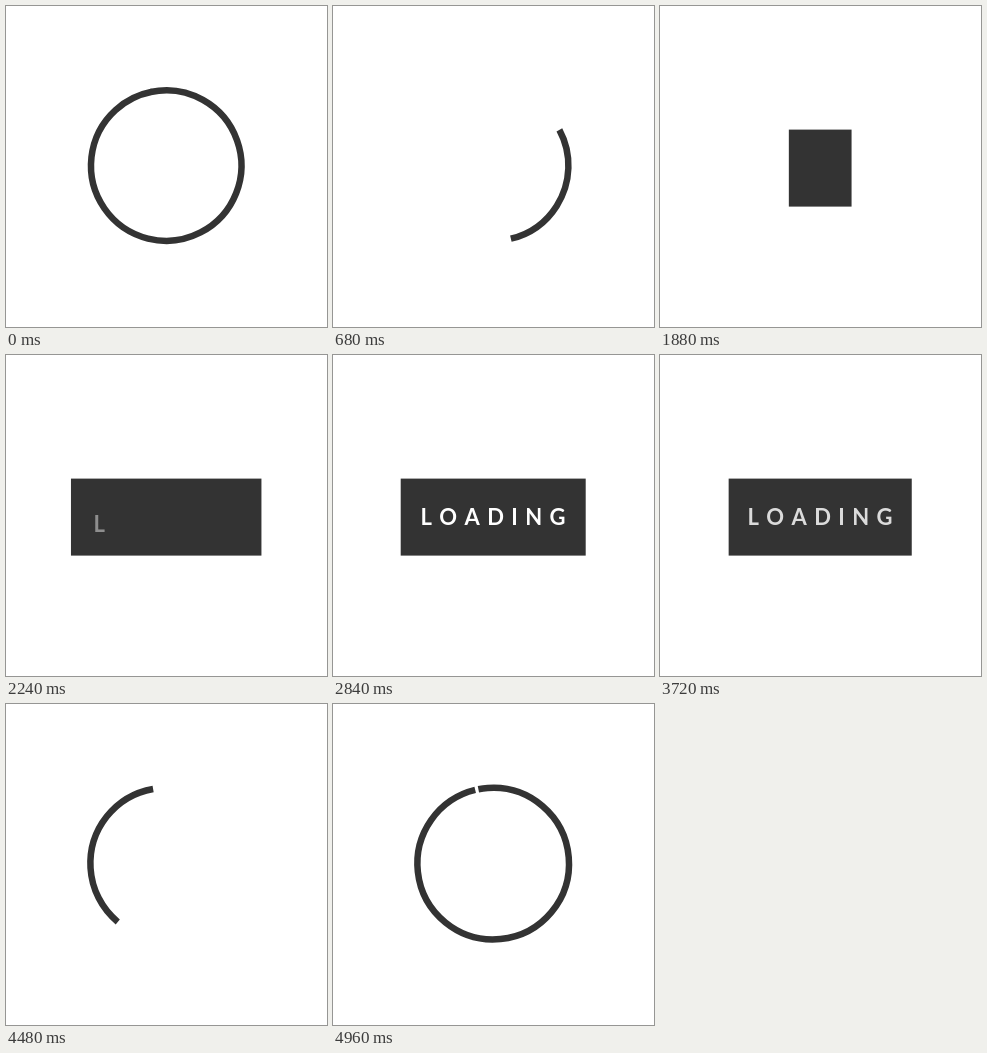
These frames come from a looping animation (321 by 321 pixels, 5000 ms). An HTML page:

```html
<!DOCTYPE html>
<html lang="en">
<head>
<meta charset="utf-8">
<title>Loading</title>
<style>
  html, body { margin: 0; width: 100%; height: 100%; overflow: hidden; background: #fff; }
  svg { position: absolute; left: 0; top: 0; display: block; }
  path { fill: none; stroke: #333; stroke-width: 6.5; }
  rect { fill: #333; }
  #word {
    position: absolute; left: 0; top: 148px; width: 320px;
    display: flex; justify-content: center; gap: 7.4px;
    font: 700 22px/27px Lato, "Open Sans", sans-serif; color: #fff;
  }
  #word span { opacity: 0; }
</style>
</head>
<body>
<svg width="321" height="321" viewBox="0 0 321 321">
  <path id="inward"/>
  <path id="outward"/>
  <rect id="panel"/>
</svg>
<div id="word"></div>
<script>
const LOOP = 5000;
const CX = 160.2, CY = 159.6;
const R_IN = 75.2, R_OUT = 75.8;
const TOP = 123.6, BOTTOM = 200.6, BAR = BOTTOM - TOP;
const SEAM = -12, LEAVE = 92, JOIN = 88;   // degrees clockwise from the top
const BEND = 30.5;                         // where the bar starts to curve, from the centre
const PANEL_IN = 1800, PANEL_OUT = 3960;

const $ = id => document.getElementById(id);
const rad = deg => deg * Math.PI / 180;
const clamp = v => Math.min(1, Math.max(0, v));

function ring(r) {
  const point = deg => [CX + r * Math.sin(rad(deg)), CY - r * Math.cos(rad(deg))];
  return {
    point,
    px: deg => rad(deg) * r,
    ahead(deg, d) {
      const [x, y] = point(deg);
      return [x + d * Math.cos(rad(deg)), y + d * Math.sin(rad(deg))];
    },
    arc(from, to) {
      const n = Math.ceil((to - from) / 90);
      let d = "";
      for (let i = 1; i <= n; i++) {
        d += ` A${r} ${r} 0 0 1 ${point(from + (to - from) * i / n)}`;
      }
      return d;
    }
  };
}

// Ring, hook under, bar upwards; then bar upwards, hook over, ring.
const a = ring(R_IN), b = ring(R_OUT);
const inDeg = LEAVE + 720 - SEAM;
const outDeg = 720 + SEAM - JOIN;
$("inward").setAttribute("d",
  `M${a.point(SEAM)}${a.arc(SEAM, LEAVE + 720)}` +
  ` C${a.ahead(LEAVE, 68)} ${CX},${CY + BEND + 61} ${CX},${CY + BEND} L${CX},${TOP}`);
$("outward").setAttribute("d",
  `M${CX},${BOTTOM} L${CX},${CY - BEND}` +
  ` C${CX},${CY - BEND - 61} ${b.ahead(JOIN, -68)} ${b.point(JOIN)}${b.arc(JOIN, JOIN + outDeg + 5)}`);

const inRing = a.px(inDeg);
const inEnd = $("inward").getTotalLength();
const outRing = $("outward").getTotalLength() - b.px(outDeg + 5);

// Keys: time, value, speed per ms
const inTail = [[80, 0, 0], [680, a.px(420 - SEAM), 1.4], [1240, inRing + 20, 0.5], [1800, inEnd - BAR, 0]];
const inHead = [[80, a.px(360) + 0.8, 0], [680, a.px(525 - SEAM), 0.9], [1240, inEnd - BAR, 0.38], [1800, inEnd, 0]];
const outTail = [[3960, 0, 0], [4200, 120, 0.85], [4800, outRing + b.px(outDeg - 360), 0]];
const outHead = [[3960, BAR, 0], [4200, 220, 1.15], [4800, outRing + b.px(outDeg - 80), 1.06], [5000, outRing + b.px(outDeg), 0]];
const panelWidth = [[1780, 6.5, 0.5], [2200, 192.5, 0], [2320, 185, 0], [3700, 185, 0], [3960, 6.5, -0.9]];

function at(keys, t) {
  if (t <= keys[0][0]) return keys[0][1];
  const i = keys.findIndex(k => k[0] > t);
  if (i < 0) return keys[keys.length - 1][1];
  const [t0, p, vp] = keys[i - 1], [t1, q, vq] = keys[i];
  const span = t1 - t0, u = (t - t0) / span, w = 1 - u;
  return p * w * w * (1 + 2 * u) + q * u * u * (3 - 2 * u) +
    span * u * w * (vp * w - vq * u);
}

function stroke(path, tail, head, visible) {
  path.style.display = visible ? "" : "none";
  if (visible) path.setAttribute("stroke-dasharray", `0 ${tail} ${head - tail} 9999`);
}

const panel = $("panel");
panel.setAttribute("y", TOP);
panel.setAttribute("height", BAR);

const letters = [..."LOADING"].map(c => {
  const span = document.createElement("span");
  span.textContent = c;
  $("word").append(span);
  return span;
});

function draw(t) {
  stroke($("inward"), at(inTail, t), at(inHead, t), t < PANEL_IN);
  stroke($("outward"), at(outTail, t), at(outHead, t), t >= PANEL_OUT);

  const width = at(panelWidth, t);
  panel.style.display = t >= PANEL_IN && t < PANEL_OUT ? "" : "none";
  panel.setAttribute("x", CX - width / 2);
  panel.setAttribute("width", width);

  const fade = 1 - clamp((t - 3700) / 120);
  letters.forEach((el, i) => {
    const left = 1 - clamp((t - 2200 - 80 * i) / 160);
    const p = 1 - left * left;
    el.style.opacity = p * fade;
    el.style.transform = `translateY(${12 * (1 - p)}px)`;
  });
}

const start = performance.now();
function tick() {
  draw((performance.now() - start) % LOOP);
  requestAnimationFrame(tick);
}
tick();
</script>
</body>
</html>
```
